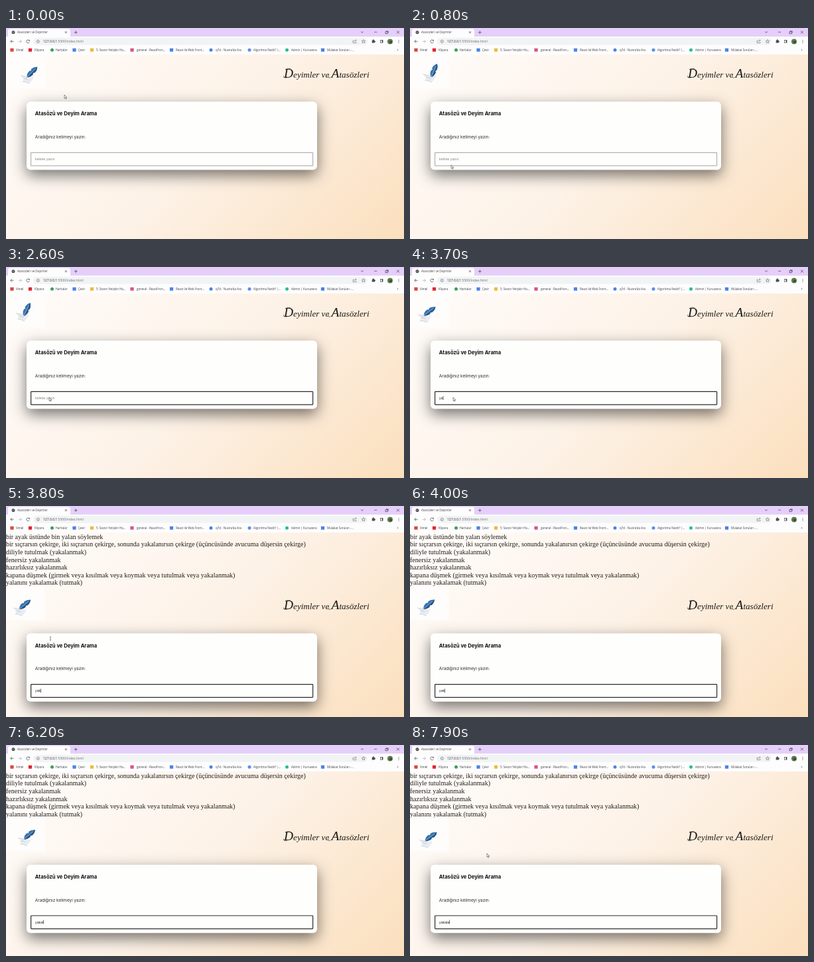
Recreate the animation shown at these times as an HTML page with a canvas. Size 600 px wide and 319 px high, loop 8 s.

```html
<!DOCTYPE html>
<html lang="tr">
<head>
<meta charset="utf-8">
<title>Atasözleri ve Deyimler</title>
<style>
html, body { margin: 0; width: 100%; height: 100%; overflow: hidden; background: #fff; }
canvas { display: block; width: 600px; height: 319px; }
</style>
</head>
<body>
<canvas id="stage"></canvas>
<script>
const LOOP = 8000, LINE = 11.6;
const UI = '"Open Sans", "Noto Sans", sans-serif';
const SANS = 'Inter, "Open Sans", sans-serif';
const FIELD = '"Liberation Sans", Arial, sans-serif';
const SERIF = '"Liberation Serif", "Times New Roman", serif';

const canvas = document.getElementById('stage');
const ctx = canvas.getContext('2d');
const dpr = window.devicePixelRatio || 1;
canvas.width = 600 * dpr;
canvas.height = 319 * dpr;

const results = [
  'bir ayak üstünde bin yalan söylemek',
  'bir sıçrarsın çekirge, iki sıçrarsın çekirge, sonunda yakalanırsın çekirge (üçüncüsünde avucuma düşersin çekirge)',
  'diliyle tutulmak (yakalanmak)',
  'fenersiz yakalanmak',
  'hazırlıksız yakalanmak',
  'kapana düşmek (girmek veya kısılmak veya koymak veya tutulmak veya yakalanmak)',
  'yalanını yakalamak (tutmak)'
];

// time, typed text
const typing = [[1900, ''], [3500, 'y'], [3700, 'ya'], [3800, 'yak'], [4200, 'yaka'], [5800, 'yakal'], [6900, 'yakala']];

// time, x, y, angle in degrees
const quillPath = [
  [0, 38, 68, -45], [1600, 33, 64, -88], [3700, 28, 68, -36], [3800, 27, 69, -40],
  [4800, 28, 67, -46], [6200, 34, 67, -40], [7900, 30, 70, -36], [8000, 31, 70, -37]
];

// time, x, y
const mousePath = [[0, 88, 101], [100, 88, 101], [800, 62, 207], [1000, 63, 203], [1600, 65, 187], [1800, 65, 197], [3700, 65, 197], [3800, 67, 197]];
const mouseReturn = [[7400, 67, 197], [7900, 116, 164], [8000, 117, 162]];

const bookmarks = [
  ['Vimel', 9, 15, '#d9483b', 0], ['Klipora', 36.5, 43, '#e8222a', 0],
  ['Haritalar', 69.5, 74.5, '#3f9d5a', 1], ['Çevir', 103, 109, '#4a83e6', 0],
  ['5. Sezon Yetişkin Ha...', 129.5, 136, '#f0b93a', 0], ['general - ReactFron...', 190, 197, '#d8557f', 0],
  ['React ile Web Front...', 249.5, 256, '#4a83e6', 0], ["q7d - Nuvira'da Ara", 309, 316, '#4a83e6', 1],
  ['Algoritma Nedir? |...', 367, 373, '#5b8fe8', 1], ['Admin | Kursavera', 423.5, 430, '#25c08a', 1],
  ['Mülakat Soruları -...', 477.5, 484, '#4a83e6', 0]
];

function text(str, x, y, size, font, color, weight = '') {
  ctx.font = `${weight} ${size}px ${font}`;
  ctx.fillStyle = color;
  ctx.fillText(str, x, y);
  return x + ctx.measureText(str).width;
}

function rect(x, y, w, h, color, r = 0) {
  ctx.beginPath();
  ctx.roundRect(x, y, w, h, r);
  ctx.fillStyle = color;
  ctx.fill();
}

function dot(x, y, r, color) {
  ctx.beginPath();
  ctx.arc(x, y, r, 0, Math.PI * 2);
  ctx.fillStyle = color;
  ctx.fill();
}

function stroke(d, color = '#5f6368', width = 0.8) {
  ctx.strokeStyle = color;
  ctx.lineWidth = width;
  ctx.stroke(new Path2D(d));
}

function along(path, t) {
  let i = 0;
  while (i < path.length - 2 && t >= path[i + 1][0]) i++;
  const a = path[i], b = path[i + 1];
  const u = Math.min(1, Math.max(0, (t - a[0]) / (b[0] - a[0])));
  const k = u * u * (3 - 2 * u);
  return a.slice(1).map((v, n) => v + (b[n + 1] - v) * k);
}

function drawBackground() {
  const g = ctx.createLinearGradient(80, -40, 520, 399);
  g.addColorStop(0, '#fffcfa');
  g.addColorStop(0.5, '#fdf2e7');
  g.addColorStop(1, '#fbdfbd');
  rect(0, 40, 600, 279, g);
}

function drawQuill(t) {
  const [x, y, deg] = along(quillPath, t);
  rect(0, 40, 58.5, 51, '#fefdfc');
  // sheet of paper
  ctx.save();
  ctx.translate(x - 5, y + 9);
  ctx.fillStyle = '#e8ecf3';
  ctx.fill(new Path2D('M-11 -5Q-3 -4 2 -2L9 -3Q6 4 2 7Q-3 4 -8 4Q-5 0 -11 -5Z'));
  stroke('M-11 -5Q-3 -4 2 -2M-8 4Q-3 4 2 7', '#b9c0ca', 0.6);
  stroke('M-6 -1L0 1', '#d6b79c', 0.7);
  ctx.restore();
  // feather
  ctx.save();
  ctx.translate(x, y);
  ctx.rotate(deg * Math.PI / 180);
  ctx.fillStyle = '#3974b2';
  ctx.fill(new Path2D('M-9 0Q-5 -5 1 -4L2 -2.5L4 -4.2Q9 -4 13 0Q9 3.8 4 3.4L2 2L0 3.6Q-6 3.5 -9 0Z'));
  ctx.fillStyle = '#285787';
  ctx.fill(new Path2D('M-9 0L13 0Q9 3.8 4 3.4L2 2L0 3.6Q-6 3.5 -9 0Z'));
  stroke('M-13 0L9 0', '#c8d8ea', 0.6);
  ctx.restore();
}

function drawTitle() {
  const ink = '#1c1815';
  let x = 419;
  for (const [part, size] of [['D', 19.5], ['eyimler ve ', 13.1], ['A', 19.5], ['tasözleri', 13.1]])
    x = text(part, x, 74.5, size, SERIF, ink, 'italic');
  stroke('M424 75Q417 76 419 72M421 63Q424 60 429 61.7M489 75Q485 76 486 72', ink, 0.6);
}

function drawCard(t) {
  ctx.save();
  ctx.shadowColor = 'rgba(0,0,0,.54)';
  ctx.shadowBlur = 22 * dpr;
  ctx.shadowOffsetY = 8 * dpr;
  rect(31, 111.3, 438, 103.3, '#fefefd', 6);
  ctx.restore();
  text('Atasözü ve Deyim Arama', 43.8, 132.4, 7.67, SANS, '#111', 'bold');
  text('Aradığınız kelimeyi yazın:', 43.8, 167.2, 6.45, SANS, '#2c2c2c');

  const focused = t >= 1900;
  ctx.strokeStyle = focused ? '#2b2b2b' : '#8d8d8d';
  ctx.lineWidth = focused ? 1.2 : 0.8;
  ctx.beginPath();
  ctx.roundRect(37.6, 188.4, 425, 19.8, focused ? 0.8 : 0);
  ctx.stroke();

  const step = typing.filter(s => t >= s[0]).pop();
  const value = step ? step[1] : '';
  if (!value) text('kelime yazın', 44, 200, 5.3, FIELD, '#858585');
  const end = value ? text(value, 44, 200, 5.3, FIELD, '#222') : 44;
  if (step && (t - step[0]) % 1000 < 500) rect(end + 0.1, 195, 0.6, 6, '#111');
}

function drawPage(t) {
  drawBackground();
  const list = t < 3800 ? [] : results.slice(t < 4200 ? 0 : 1);
  list.forEach((s, i) => text(s, 0, 49.8 + i * LINE, 10, SERIF, '#201d1a'));
  ctx.save();
  ctx.translate(0, list.length * LINE);
  drawQuill(t);
  drawTitle();
  drawCard(t);
  ctx.restore();
}

function drawBrowser() {
  rect(0, 0, 600, 13, '#e5cffa');
  rect(0, 13, 600, 27, '#fefdfe');
  rect(3, 1.5, 94, 13, '#fefdfe', [3, 3, 0, 0]);
  dot(11, 6.5, 2.5, '#4a4d51');
  stroke('M9.3 6Q11 7.5 12.6 5.5', '#d8d8da', 0.6);
  text('Atasözleri ve Deyimler', 17, 8.2, 4.45, UI, '#44464a');
  stroke('M88.9 5L91.9 8M91.9 5L88.9 8M105.3 4.2V9M102.9 6.6H107.7', '#444', 0.7);
  stroke('M535 5.3L537 7.2L539 5.3M555.2 6.2H559.2M573 4.7H576.2V7.8M572 5.6H575.2V8.6H572ZM589 4.4L593 8.4M593 4.4L589 8.4', '#3d3842', 0.7);

  stroke('M11.6 20.3H6.8M9 18L6.8 20.3L9 22.6', '#55585c');
  stroke('M18.7 20.3H23.5M21.3 18L23.5 20.3L21.3 22.6', '#b2b4b8');
  stroke('M35.2 19A2.4 2.4 0 1 0 35.4 21.3M35.4 17.8V19.4H33.8', '#55585c');

  rect(41, 14.8, 504, 11, '#f2f3f4', 5.5);
  stroke('M46.2 20.3A2.1 2.1 0 1 1 50.4 20.3A2.1 2.1 0 1 1 46.2 20.3M48.3 20V21.5M48.3 18.9V19.3', '#5f6368', 0.6);
  const x = text('127.0.0.1', 56, 22.2, 5.03, UI, '#25272a');
  text(':5500/index.html', x, 22.2, 5.03, UI, '#6b6f74');
  stroke('M524.5 19H523.2V22.6H528V21M524.9 21Q525 18.7 528 18.7M526.8 17.4L528.2 18.7L526.8 20', '#5f6368', 0.6);
  stroke('M539 17.5L539.8 19.3L541.8 19.5L540.3 20.8L540.7 22.7L539 21.7L537.3 22.7L537.7 20.8L536.2 19.5L538.2 19.3Z', '#5f6368', 0.6);

  rect(551.7, 18.6, 4.2, 4, '#4b4e52', 0.5);
  dot(553.8, 18.3, 1, '#4b4e52');
  dot(556, 20.5, 1, '#4b4e52');
  rect(564, 18, 4.4, 4.6, '#3f4246', 0.5);
  rect(564.7, 18.7, 2, 3.2, '#fefdfe');
  dot(579, 20.4, 4, '#587a49');
  dot(580, 21.2, 1.8, '#36472f');
  for (const y of [18.5, 20.4, 22.3]) dot(592, y, 0.55, '#4b4e52');

  for (const [label, ix, tx, color, round] of bookmarks) {
    if (round) dot(ix, 33.2, 2.5, color);
    else rect(ix - 2.6, 30.7, 5.2, 5, color, 0.5);
    text(label, tx, 34.8, 4.43, UI, '#3f4246');
  }
  stroke('M589.8 32L591.2 33.2L589.8 34.4', '#55585c', 0.7);
}

function drawMouse(t) {
  if (t >= 4000 && t < 7400) return;
  const [x, y] = along(t < 4000 ? mousePath : mouseReturn, t);
  ctx.save();
  ctx.translate(x, y);
  if (t >= 3800 && t < 4000) {
    stroke('M-1 1H1M0 1V6M-1 6H1', '#444', 0.6);
  } else {
    const arrow = 'M0 0V5.4L1.2 4.3L2.1 6.2L3 5.8L2.1 4H3.8Z';
    ctx.fillStyle = '#fff';
    ctx.fill(new Path2D(arrow));
    stroke(arrow, '#333', 0.55);
  }
  ctx.restore();
}

function frame(now) {
  const t = now % LOOP;
  ctx.setTransform(dpr, 0, 0, dpr, 0, 0);
  drawPage(t);
  drawBrowser();
  drawMouse(t);
  requestAnimationFrame(frame);
}
requestAnimationFrame(frame);
</script>
</body>
</html>
```
